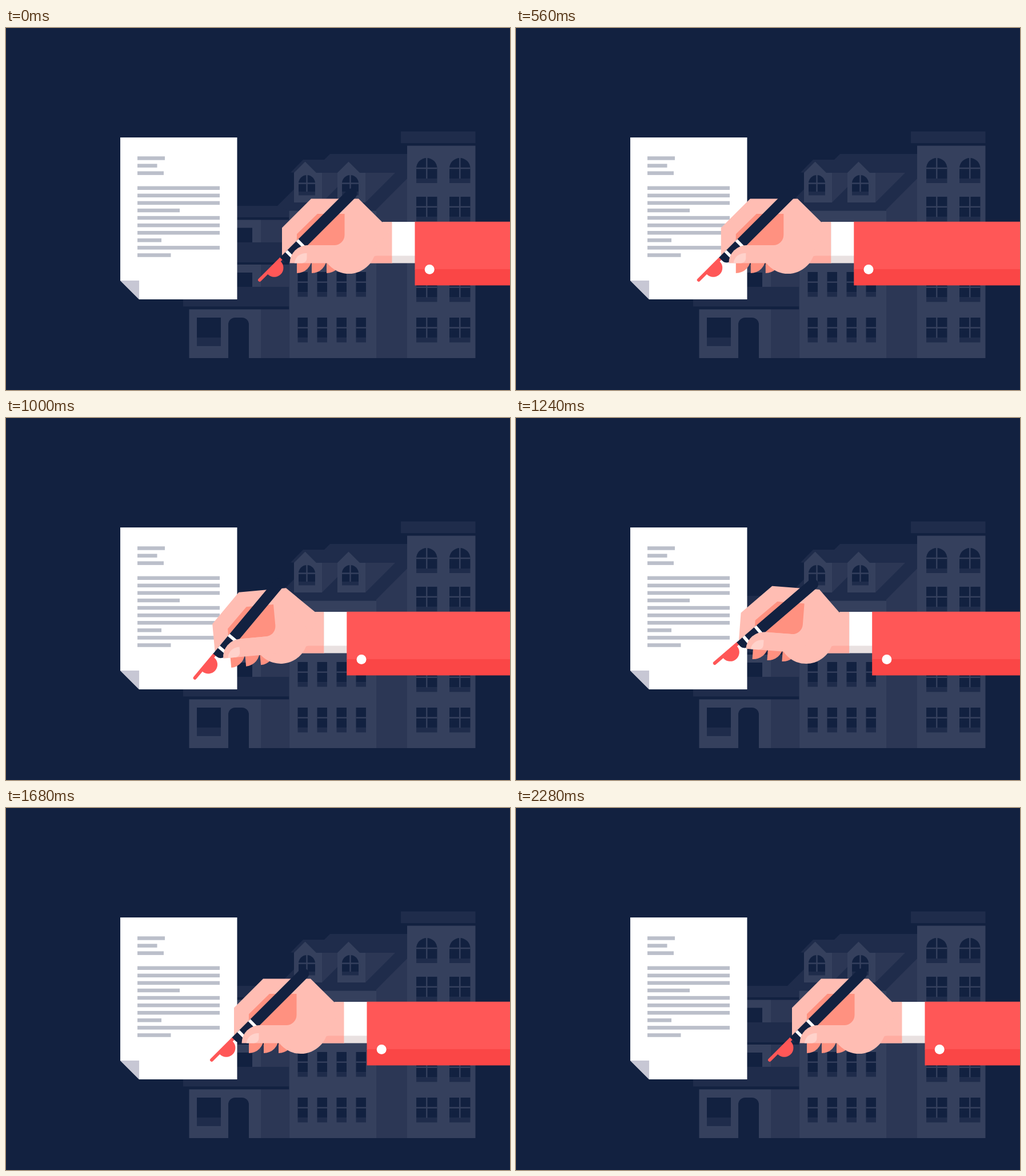
Recreate the animation shown at these times as an HTML page. Size 882 by 635 pixels, loop 2.48 s.

```html
<!DOCTYPE html>
<html lang="en">
<head>
<meta charset="utf-8">
<title>Signing a contract</title>
<style>
  html, body { margin: 0; width: 100%; height: 100%; overflow: hidden; background: #122140; }
  svg { display: block; width: 882px; height: 635px; }
  .bg { fill: #122140; }
  .dark { fill: #1f2c4b; }
  .mid { fill: #2c3755; }
  .light { fill: #35405d; }
  .bar { stroke: #35405d; stroke-width: 2.4; }
  .skin { fill: #ffbdb3; }
  .shade { fill: #ff9180; }
  .white { fill: #fff; }
  .red { fill: #ff5757; }
</style>
</head>
<body>
<svg viewBox="0 0 882 635">
  <!-- left wing -->
  <path class="dark" d="M380 312H495.500V332H380ZM380 376H495.500V411H380ZM310 454H495.500V488.500H310Z"/>
  <path class="light" d="M380 336.500H446V376H380ZM380 415H446V454H380ZM320.500 493.500H446V579H320.500Z"/>
  <path class="mid" d="M446 336.500H495.500V376H446ZM446 415H495.500V454H446ZM446 493.500H495.500V579H446Z"/>
  <path class="bg" d="M395 350.500H431V376H395ZM395 429H431V454H395ZM334 508H376V543H334Z"/>
  <path class="dark" d="M334 543H376V558H334Z"/>
  <path class="bg" d="M389 579V520A12 12 0 0 1 401 508H413A12 12 0 0 1 425 520V579Z"/>

  <!-- main house -->
  <path class="dark" d="M504 283L475 312L495 320.500H648L702 264V221H567L557 231H520L498 253.500H504Z"/>
  <path class="mid" d="M648 318.500L702 264V579H648Z"/>
  <path class="light" d="M495.500 320.500H648V579H495.500Z"/>
  <g id="dormers"></g>

  <!-- tower -->
  <path class="dark" d="M691 181.500H821.500V202H691Z"/>
  <path class="light" d="M702 206.500H821.500V579H702Z"/>
  <g id="windows"></g>

  <!-- paper -->
  <path class="white" d="M200 192H404.500V476H233L200 443Z"/>
  <path fill="#c7c7d4" d="M200 443H233V476Z"/>
  <g id="lines" fill="#bbbfca"></g>

  <g id="arm">
    <path class="skin" d="M659 340H676V412.500H620L632 380Z"/>
    <path fill="#ffaca1" d="M636.500 412.500A13 13 0 0 1 649.500 399.500H676V412.500Z"/>
    <g id="hand">
      <path class="shade" d="M509 400V430A26 26 0 0 0 535 404V430A26 26 0 0 0 561 404V430A26 26 0 0 0 587 404Z"/>
      <path class="skin" d="M483 350.500L534 299.500H617L672 354L640 399H620V412H510V399H483Z"/>
      <circle class="skin" cx="600" cy="383.500" r="47.500"/>
      <path class="shade" d="M545 326H592.500V363A18 18 0 0 1 574.500 381H509V361.500Z"/>
      <g transform="translate(444 442) rotate(-45)">
        <path class="red" d="M0 -3H54V3H33A16 16 0 0 1 17 19A16 16 0 0 1 17 3H0A3 3 0 0 1 0 -3Z" style="display:none"/>
        <path class="red" d="M0 -3H54V3H49A16 16 0 0 1 17 3H0A3 3 0 0 1 0 -3Z"/>
        <path class="bg" d="M53 -2.800H220.500A9.500 9.500 0 0 1 220.500 16.300H64A11 11 0 0 1 53 5.300Z"/>
        <path class="white" d="M66 -2.800H71.500V16.300H66ZM93 -2.800H98.500V16.300H93Z"/>
      </g>
      <path class="skin" d="M496.500 412.500A31.500 31.500 0 0 1 528 381H600V412.500Z"/>
      <path fill="#ffd2cb" d="M505 412.500A20 18 0 0 1 526.500 395V404A8.500 8.500 0 0 1 518 412.500Z"/>
    </g>
    <path class="white" d="M675.500 340H718V400H675.500Z"/>
    <path fill="#e9e1e1" d="M675.500 399.500H718V412.500H675.500Z"/>
    <path class="red" d="M715.500 339.800H1100V424H715.500Z"/>
    <path fill="#fa4646" d="M715.500 423H1100V451.500H715.500Z"/>
    <circle class="white" cx="741.200" cy="423.500" r="8.500"/>
  </g>
</svg>

<script>
const byId = id => document.getElementById(id);
const path = (cls, d) => `<path class="${cls}" d="${d}"/>`;
const rect = (cls, x, y, w, h) => path(cls, `M${x} ${y}h${w}v${h}h${-w}Z`);

// One window: glass, crossing bars and a sill.
function pane(x, y, w, h, sill, { arch = false, split = true } = {}) {
  const r = w / 2;
  const glass = arch
    ? path('bg', `M${x} ${y + h}V${y + r}a${r} ${r} 0 0 1 ${w} 0V${y + h}Z`)
    : rect('bg', x, y, w, h);
  const cross = `M${x} ${y + h / 2}h${w}` + (split ? `M${x + r} ${y}v${h}` : '');
  return glass + rect('dark', x, y + h, w, sill) + path('bar', cross);
}

byId('dormers').innerHTML = [504, 580].map(x =>
  path('mid', `M${x + 49} 254h52l-52 52Z`) +
  path('light', `M${x} 306V254l19.500 -19.500l19.500 19.500h10v52Z`) +
  pane(x + 8, 258, 29, 29, 6.5, { arch: true })
).join('');

let panes = '';
for (const x of [510.5, 544.5, 578.5, 612.5])
  for (const y of [428, 508]) panes += pane(x, y, 17.5, 35.5, 8, { split: false });
for (const x of [718, 776]) {
  panes += pane(x, 228, 36.5, 36, 8, { arch: true });
  for (const y of [296, 437, 508]) panes += pane(x, y, 36.5, 35.5, 8);
}
byId('windows').innerHTML = panes;

const widths = [48, 34.5, 46, 0, 144, 144, 144, 74, 144, 144, 144, 42, 144, 58.5];
byId('lines').innerHTML = widths.map((w, i) =>
  `<rect x="230" y="${225.2 + 13.08 * i}" width="${w}" height="6.500"/>`).join('');

// Keys are [ms, value], eased in and out between neighbours.
const LOOP = 2480, STEP = 40;
const slide = [[80, 0], [640, -131.5], [800, -131.5], [1400, -84], [1680, -84], [2280, 0]];
const tilt = [[640, 0], [780, 4.8], [1000, -5.2], [1220, 4.5], [1450, -4.1], [1680, 0]];

function at(keys, t) {
  const i = keys.findIndex(k => k[0] > t);
  if (i === 0) return keys[0][1];
  if (i < 0) return keys[keys.length - 1][1];
  const [t0, a] = keys[i - 1], [t1, b] = keys[i];
  const p = (t - t0) / (t1 - t0);
  return a + (b - a) * p * p * (3 - 2 * p);
}

const arm = byId('arm'), hand = byId('hand');
function draw() {
  const t = Math.floor(performance.now() % LOOP / STEP) * STEP;
  arm.setAttribute('transform', `translate(${at(slide, t)} 0)`);
  hand.setAttribute('transform', `rotate(${at(tilt, t)} 600 385)`);
  requestAnimationFrame(draw);
}
draw();
</script>
</body>
</html>
```
